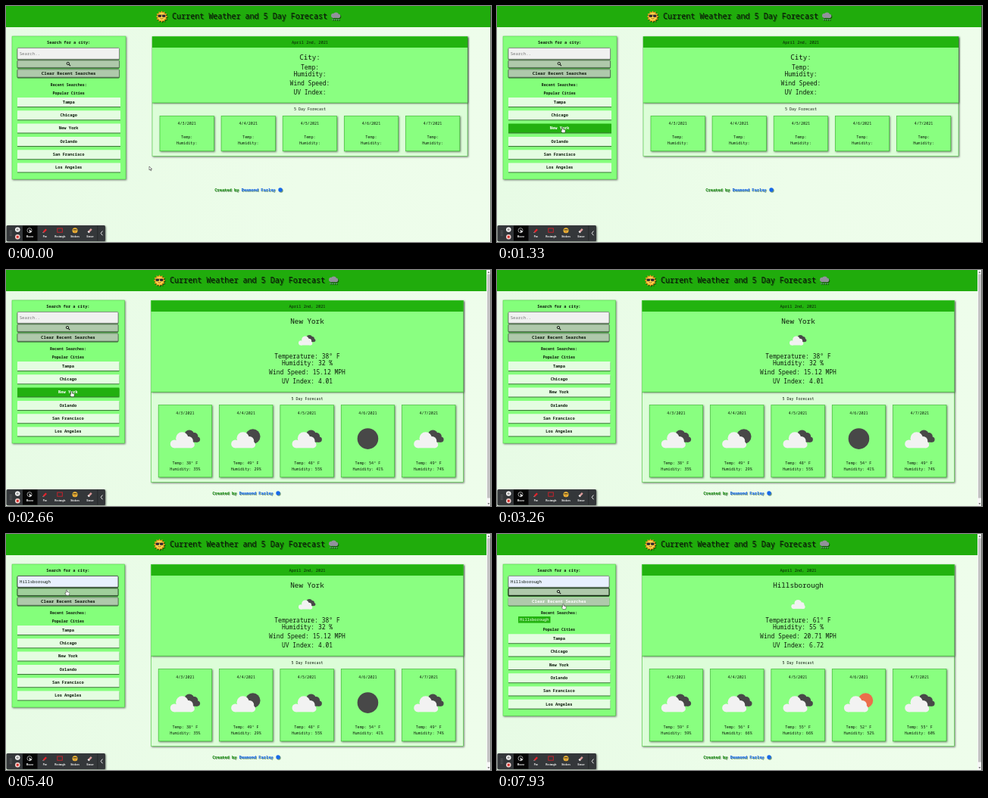
These frames come from a looping animation (640x312 px, 8000 ms). An HTML page:

```html
<!DOCTYPE html>
<html lang="en">
<head>
<meta charset="utf-8">
<title>Current Weather and 5 Day Forecast</title>
<style>
html, body { margin: 0; width: 100%; height: 100%; overflow: hidden; background: #ecfde9; }
svg { display: block; width: 100vw; height: 100vh; }
text { font-family: "Noto Sans Mono", "DejaVu Sans Mono", monospace; fill: #0b180a; }
.sans { font-family: "Liberation Sans", Arial, sans-serif; }
.bold { font-weight: 600; }
.title { font-weight: 500; filter: drop-shadow(1.2px 1.2px .7px rgba(0, 0, 0, .5)); }
.raised { filter: drop-shadow(1.6px 1.6px 1.2px rgba(0, 0, 0, .5)); }
.button { filter: drop-shadow(.8px 1px .5px rgba(0, 0, 0, .55)); }
.footer { filter: drop-shadow(1px 1px .6px rgba(0, 60, 0, .5)); }
</style>
</head>
<body>
<svg viewBox="0 0 640 312" preserveAspectRatio="none">
  <defs>
    <linearGradient id="page"><stop stop-color="#e7fbe5"/><stop offset=".6" stop-color="#edfdea"/><stop offset="1" stop-color="#eefdeb"/></linearGradient>
    <g id="cloud">
      <circle cx="-14.2" cy="6.8" r="5.4"/><circle cx="-4" cy="-.5" r="8.3"/>
      <circle cx="4.5" cy="3" r="6"/><circle cx="8" cy="7.8" r="4.4"/>
      <rect x="-14.5" y="3" width="23" height="9.2"/>
    </g>
    <g id="smallCloud">
      <circle cx="5.5" cy="-5" r="6.6"/><circle cx="12" cy="-3" r="5"/>
      <circle cx="16.2" cy="1" r="3.6"/><rect x="3" y="-3" width="13" height="7.6"/>
    </g>
  </defs>
  <g id="scene"></g>
  <g id="pointer"></g>
</svg>
<script>
const LOOP = 8000;
const GREEN = '#22b30f', LIME = '#89ff80', DARK = '#484848';
const scene = document.getElementById('scene');
const pointer = document.getElementById('pointer');

const cities = ['Tampa', 'Chicago', 'New York', 'Orlando', 'San Francisco', 'Los Angeles'];
const newYork = {
  city: 'New York', temp: 38, humidity: 32, wind: '15.12', uv: '4.01', sky: 'broken',
  days: [[38, 35, 'broken'], [49, 29, 'moonCloud'], [48, 55, 'broken'], [54, 41, 'moon'], [49, 74, 'broken']]
};
const hillsborough = {
  city: 'Hillsborough', temp: 61, humidity: 55, wind: '20.71', uv: '6.72', sky: 'cloudy',
  days: [[59, 59, 'broken'], [56, 66, 'broken'], [55, 66, 'broken'], [52, 52, 'sunCloud'], [55, 60, 'broken']]
};

// Pointer waypoints: time, x, y
const path = [
  [0, 189, 212], [60, 189, 212], [800, 104, 169.5], [1130, 104, 169.5], [1300, 86.5, 160.5],
  [2660, 86.5, 160.5], [3200, 80, 63], [5000, 60, 68], [5560, 85, 75.5], [6060, 85, 75.5],
  [6200, 87, 75.5], [6800, 87, 75.5], [7200, 88, 92], [7730, 88, 92], [7930, 87.5, 92.5], [8000, 87.5, 92.5]
];

function pointerAt(t) {
  const i = Math.max(1, path.findIndex(p => p[0] >= t));
  const [t0, x0, y0] = path[i - 1], [t1, x1, y1] = path[i];
  const k = (t - t0) / (t1 - t0), e = k * k * (3 - 2 * k);
  return [x0 + (x1 - x0) * e, y0 + (y1 - y0) * e];
}

const rect = (x, y, w, h, fill, extra = '') =>
  `<rect x="${x}" y="${y}" width="${w}" height="${h}" fill="${fill}" ${extra}/>`;
const circle = (x, y, r, fill, extra = '') =>
  `<circle cx="${x}" cy="${y}" r="${r}" fill="${fill}" ${extra}/>`;
const line = (d, stroke, width, extra = '') =>
  `<path d="${d}" fill="none" stroke="${stroke}" stroke-width="${width}" ${extra}/>`;
// y is the visual middle of the text
const text = (x, y, size, str, extra = '', anchor = 'middle') =>
  `<text x="${x}" y="${y + size * .35}" font-size="${size}" text-anchor="${anchor}" ${extra}>${str}</text>`;
const outline = (color, width = .6) => `stroke="${color}" stroke-width="${width}"`;

function sky(kind, x, y, scale = 1) {
  const front = '<use href="#cloud" fill="#f2f2f2"/>';
  const art = {
    broken: `<use href="#smallCloud" fill="${DARK}"/>` + front,
    moonCloud: circle(9, -3, 9.8, DARK) + front,
    sunCloud: circle(9, -3, 9.8, '#eb6e4b') + front,
    moon: circle(0, 0, 13.8, DARK),
    cloudy: `<g transform="translate(4 -1)">${front}</g>`
  };
  return `<g transform="translate(${x} ${y}) scale(${scale})">${art[kind]}</g>`;
}

function header(dx) {
  const rays = Array.from({ length: 24 }, (_, i) => {
    const a = i * Math.PI / 12, r = i % 2 ? 5.7 : 7.8;
    return `${r * Math.cos(a)},${r * Math.sin(a)}`;
  }).join(' ');
  const sun = `<g class="title" transform="translate(${205.5 + dx} 14)"><polygon points="${rays}" fill="#f59a23"/>`
    + circle(0, 0, 5.2, '#ffd34a') + rect(-4.9, -2.2, 4.4, 2.9, '#2b2430', 'rx="1.2"')
    + rect(.5, -2.2, 4.4, 2.9, '#2b2430', 'rx="1.2"') + line('M-5-2H5', '#2b2430', .6)
    + line('M-2 2.3Q0 4 2.2 2.1', '#8a4b12', .7) + '</g>';
  const rain = `<g class="title" transform="translate(${435 + dx} 14)">`
    + circle(-3, -1.2, 3, '#92929c') + circle(.5, -2, 3.4, '#92929c') + circle(3.6, -.8, 2.6, '#92929c')
    + rect(-4, -1.5, 8.5, 3.3, '#92929c')
    + line('M-4 3v2M-1.3 3v2M1.4 3v2M4 3v2', '#77779a', 1) + '</g>';
  return rect(0, 0, 640, 28, '#20ac0c') + sun + rain
    + text(321.5 + dx, 13.5, 10.05, 'Current Weather and 5 Day Forecast', 'class="title"');
}

function cityButtons(s) {
  const shift = s.searched ? 11.3 : 0, w = s.bar ? 134.5 : 136;
  return cities.map((name, i) => {
    const y = 121 + shift + i * 17.3, hot = s.hover === name;
    return `<g class="button">${rect(15, y, w, 12, hot ? '#22b010' : '#e4fde1', 'rx=".5"')}</g>`
      + text(s.cx, y + 6, 5.35, name, `class="bold"${hot ? ' style="fill:#fff"' : ''}`);
  }).join('');
}

function sidebar(s) {
  const cx = s.cx, w = s.bar ? 133 : 134.5, shift = s.searched ? 11.3 : 0;
  const lit = s.hover === 'search', clear = s.hover === 'clear';
  const filled = s.preview || s.value;
  let out = `<g class="raised">${rect(8, 40, s.bar ? 148.5 : 150, 189 + shift, '#84ff7b', outline('#45cf39', .5))}</g>`
    + text(cx, 48.5, 5.3, 'Search for a city:', 'class="bold"')
    + `<g class="button">${rect(15, 55.5, w, 14.8, filled ? '#e8f0fe' : '#f0f1f0', 'rx="1" ' + outline(s.focus ? '#333' : '#777', .8))}</g>`;
  if (s.preview) out += text(18.8, 63, 4.6, 'Hillsborough', 'class="sans"', 'start');
  else if (s.value) out += text(18, 63, 5.7, 'Hillsborough', '', 'start');
  else out += text(17.7, 63, 5.7, 'Search..', 'style="fill:#777"', 'start');
  if (s.caret) out += line('M18.2 59.5v7', '#111', .6);

  const ink = lit ? '#f4fff2' : '#111';
  out += `<g class="button">${rect(15, 71.8, w, 9.6, lit ? '#a0cf9b' : '#afc9ab', 'rx=".8" ' + outline(s.searched || lit ? '#142812' : '#4a594a', s.searched ? 1.1 : .7))}</g>`
    + circle(cx - .9, 76, 1.7, 'none', outline(ink, .9)) + line(`M${cx + .4} 77.3l1.9 1.9`, ink, 1.1)
    + `<g class="button">${rect(15, 83.8, w, 10.4, '#afc9ab', 'rx=".8" ' + outline(clear ? '#afc9ab' : '#4a594a', .7))}</g>`
    + text(cx, 89, 5.7, 'Clear Recent Searches', `class="bold"${clear ? ' style="fill:#fff"' : ''}`)
    + text(cx, 103.8, 5, 'Recent Searches:', 'class="bold"')
    + text(cx, 115.2 + shift, 5.05, 'Popular Cities', 'class="bold"');
  if (s.searched)
    out += rect(28, 109, 42.5, 8.6, GREEN) + text(49.3, 113.3, 5.35, 'Hillsborough', 'style="fill:#f2fff0"');
  return out + cityButtons(s);
}

function dashboard(s) {
  const w = s.weather, bar = s.bar;
  const x = bar ? 191.5 : 193, width = bar ? 412 : 416, mid = x + width / 2;
  const drop = bar ? 33.3 : 0, cardH = w ? 95.3 : 46.5;
  const split = 128 + drop, cardY = 145.3 + drop, bottom = cardY + cardH + 6.7;
  const cardW = bar ? 70.4 : 71.4, pitch = bar ? 80.35 : 81.1, firstX = bar ? 201.2 : 203;
  const rows = w
    ? [`Temperature: ${w.temp}° F`, `Humidity: ${w.humidity} %`, `Wind Speed: ${w.wind} MPH`, `UV Index: ${w.uv}`]
    : ['Temp:', 'Humidity:', 'Wind Speed:', 'UV Index:'];

  let out = `<g class="raised">${rect(x, 40.3, width, bottom - 40.3, '#dcfdd8', outline('#4bcb40', .6))}</g>`
    + `<g class="raised">${rect(x, 40.3, width, split - 40.3, '#8aff81')}</g>`
    + rect(x, 40.3, width, 14.7, GREEN)
    + line(`M${x} ${split}h${width}`, '#2fab26', .6)
    + text(mid, 47.8, 5.35, 'April 2nd, 2021')
    + text(mid, 68, 9.25, w ? w.city : 'City:')
    + rows.map((row, i) => text(mid, [80.9, 90.2, 102, 114][i] + drop, 8, row)).join('')
    + text(mid, 136.6 + drop, 5, '5 Day Forecast');
  if (bar) out += sky(w.sky, mid - .3, 92.5, .57);

  for (let i = 0; i < 5; i++) {
    const left = firstX + i * pitch, cx = left + cardW / 2, day = w && w.days[i];
    const base = cardY + cardH;
    out += `<g class="raised">${rect(left, cardY, cardW, cardH, LIME, outline('#35b92b', .6))}</g>`
      + text(cx, cardY + 10.2, 5.1, `4/${i + 3}/2021`)
      + text(cx, base - 19, 5.15, day ? `Temp: ${day[0]}° F` : 'Temp:')
      + text(cx, base - 11, 5.15, day ? `Humidity: ${day[1]}%` : 'Humidity:');
    if (day) out += sky(day[2], cx, cardY + 44.5);
  }
  const fy = bottom + (bar ? 14.4 : 44.5) - (w && !bar ? 30 : 0), fx = bar ? 272.3 : 275.3;
  return out + `<g class="footer">`
    + text(fx, fy, 5.35, 'Created by', 'class="bold" style="fill:#128a0b"', 'start')
    + text(fx + 35.4, fy, 5.35, 'Desmond Farley', 'class="bold" style="fill:#0d62f0"', 'start')
    + circle(fx + 86.7, fy, 2.7, '#1769ea') + '</g>';
}

function toolbar() {
  const labels = ['Mouse', 'Pen', 'Rectangle', 'Stickers', 'Eraser'];
  let out = `<g class="raised">${rect(.5, 290, 130.5, 21, '#34373a', 'rx="1.5"')}</g>`
    + rect(22, 290.5, 19.5, 20, '#050505');
  for (let i = 0; i < 8; i++) out += circle(5.3 + i % 2 * 1.8, 297.4 + (i >> 1) * 2, .45, '#aaa');
  out += circle(15.3, 295.6, 3.2, '#fff') + line('M14.5 294.2v2.8M16.1 294.2v2.8', '#333', .7)
    + circle(15.3, 305.2, 3.2, '#f3d4d1') + rect(13.8, 303.7, 3, 3, '#d92f2a', 'rx=".4"');
  out += labels.map((s, i) => text(31.5 + i * 19.9, 304.6, 3, s, 'class="sans" font-weight="700" style="fill:#fff"')).join('');
  return out + circle(31, 296.6, 3, 'none', outline('#ddd', .7))
    + '<path d="M30.5 295.3l4 3.6-2 .1-1 1.5z" fill="#fff"/>'
    + line('M49.5 299l3.6-3.8', '#e5222b', 2.3) + line('M48.7 299.8l1-1', '#fff', .8)
    + rect(67.8, 294, 6.5, 5.2, 'none', outline('#d3202a', .9))
    + circle(91, 296.7, 3.5, '#f7bd35') + line('M88.5 295.9h5', '#342520', 1.2) + line('M89.5 298.3q1.5 1 3 0', '#a23a2a', .6)
    + line('M109 298.8l3.8-4', '#d99a9a', 2.5) + line('M108.4 299.4l1.3-1.3', '#eee', 2.5)
    + line('M120.8 290.5v20', '#1d1f21', .6) + line('M127.4 297.5l-2.2 2.9 2.2 2.9', '#fff', .9);
}

function scrollbar() {
  return rect(634, 0, 6, 312, '#f7f7f7') + rect(635, 5.5, 4, 296, '#c4c4c4')
    + '<path d="M635.4 3.7h3L636.9 2zM635.4 308.3h3l-1.5 1.7z" fill="#555"/>';
}

function drawScene(s) {
  return rect(0, 0, 640, 312, 'url(#page)') + header(s.bar ? -3 : 0) + sidebar(s) + dashboard(s)
    + (s.bar ? scrollbar() : '') + rect(639.2, 0, .8, 312, '#3c453b') + toolbar();
}

function hoverAt(x, y, searched) {
  if (x < 15 || x > 150) return '';
  if (y >= 71.5 && y <= 82) return 'search';
  if (y >= 83.5 && y <= 94.5) return 'clear';
  const offset = y - 121 - (searched ? 11.3 : 0), i = Math.floor(offset / 17.3);
  return offset >= 0 && offset - i * 17.3 <= 12 && cities[i] || '';
}

function drawPointer(t, x, y, hover) {
  let out = '';
  const since = t >= 6400 ? t - 6400 : t - 1600;
  if (since >= 0 && since < 320) {
    const r = 6 + 3 * Math.min(1, since / 60);
    out += circle(x, y, r, 'rgba(255,80,70,.22)', outline('#dc4b38', 1));
  }
  if (t >= 3200 && t < 5060) return out;
  const shape = hover
    ? 'M-.6 0q.7-.6 1.2.1v2.4l2.6.7q.8.4.6 1.3l-.7 2.6h-3.5l-2-2.7q.2-.9 1.3-.2z'
    : 'M0 0v5l1.2-1.1.9 2 .8-.4-.9-1.9h1.7z';
  return out + `<path transform="translate(${x} ${y})" d="${shape}" fill="#fff" stroke="#222" stroke-width=".5"/>`;
}

let lastKey = '';
function frame(now) {
  const t = now % LOOP, [x, y] = pointerAt(t);
  const searched = t >= 6440, focus = t >= 3660 && t < 6400;
  const hidden = t >= 3200 && t < 5060;
  const state = {
    bar: t >= 2000, cx: t >= 2000 ? 81.9 : 82.7, searched, focus,
    hover: hidden ? '' : hoverAt(x, y, searched),
    preview: t >= 4200 && t < 5000, value: t >= 5000,
    caret: focus && t < 5000 && (t - 3660) % 1000 < 500,
    weather: t < 1930 ? null : t < 6730 ? newYork : hillsborough
  };
  const key = JSON.stringify(state);
  if (key !== lastKey) {
    scene.innerHTML = drawScene(state);
    lastKey = key;
  }
  pointer.innerHTML = drawPointer(t, x, y, state.hover);
}

const start = performance.now();
function tick() {
  frame(performance.now() - start);
  requestAnimationFrame(tick);
}
tick();
</script>
</body>
</html>
```
